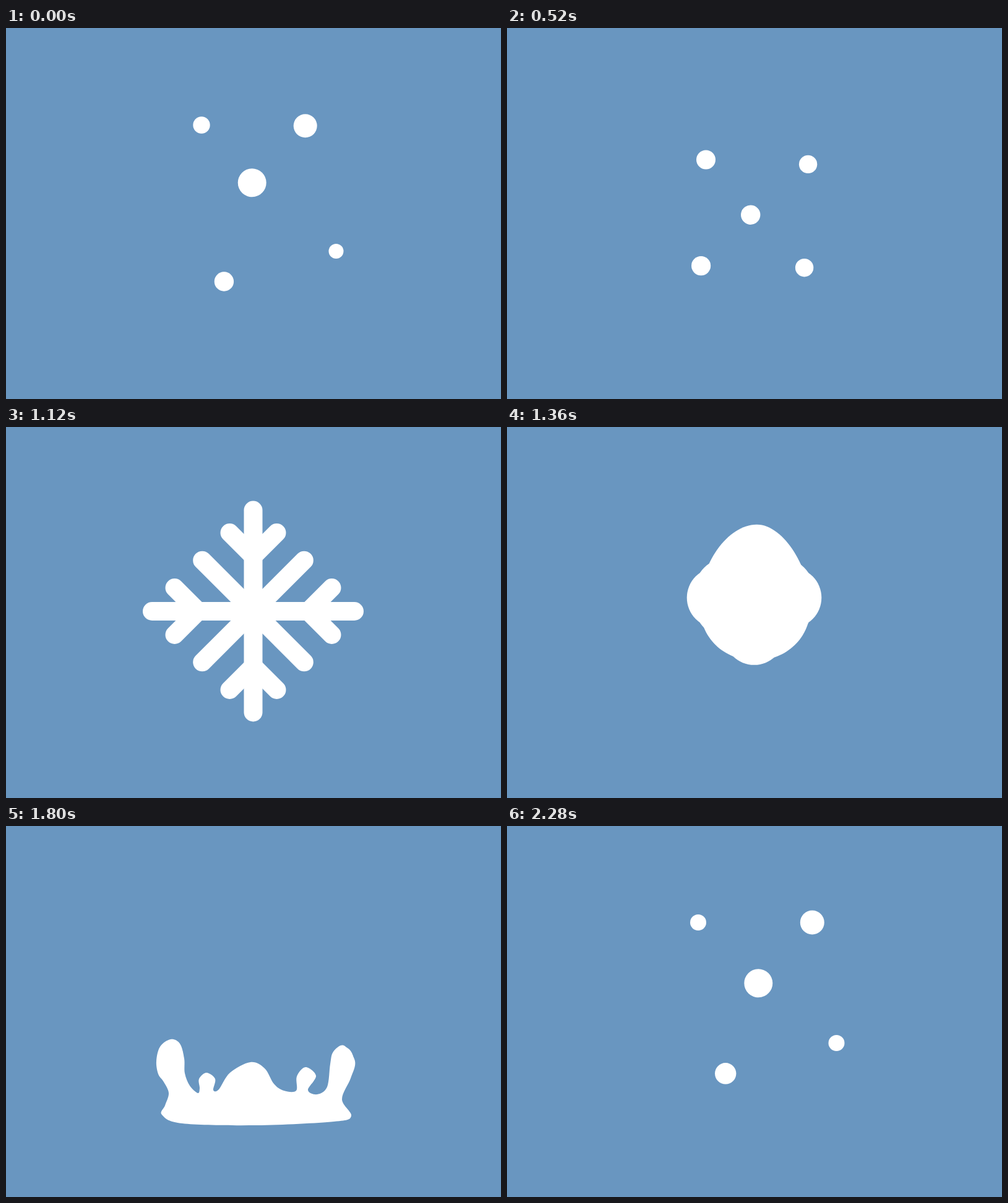
An HTML page with a canvas for the animation above (2320 ms loop, 800x600 px).

```html
<!DOCTYPE html>
<html>
<head>
<meta charset="utf-8">
<title>Snow, water, drops</title>
<style>
html, body { margin: 0; width: 100%; height: 100%; overflow: hidden; background: #6996c0; }
canvas { display: block; }
</style>
</head>
<body>
<canvas id="stage" width="800" height="600"></canvas>
<script>
const ctx = document.getElementById('stage').getContext('2d');
const LOOP = 2320, STEP = 40, FLOOR = 483;

// Drop keys: time, x, y, rx, ry. Negative times lie at the end of the loop.
const drops = [
  { tilt: 0, keys: [[-520, 266, 370, 20, 23], [-360, 261, 234, 25.5, 24], [-240, 270, 175, 19, 19],
    [-120, 286, 157, 14, 14], [-40, 309, 156, 13, 13], [0, 316, 157, 13.7, 13.7],
    [240, 331, 186, 15, 15], [520, 321.5, 213, 15.5, 15.5], [600, 317, 217, 15, 15]] },
  { tilt: 0, keys: [[-520, 545, 380, 17, 23], [-360, 547, 236, 21, 28], [-240, 532, 178, 21, 23],
    [-120, 510, 157, 20, 20], [-40, 493.3, 156, 19.5, 19.5], [0, 483.7, 158.3, 19, 19],
    [240, 468, 188, 16, 16], [520, 486.6, 220.4, 14.7, 14.7], [600, 481.5, 217.5, 15, 15]] },
  { tilt: -0.6, keys: [[-520, 485, 407, 13, 13], [-360, 485, 319, 22.5, 18.5], [-200, 446, 274, 22, 21],
    [-40, 406.3, 254.3, 23, 23], [0, 397.7, 250.3, 23, 23],
    [240, 378, 272, 19, 19], [520, 393.7, 302.2, 15.7, 15.7], [600, 399.5, 298, 15, 15]] },
  { tilt: 0, keys: [[-520, 490, 470, 8, 8], [-360, 500, 470, 8, 8], [-200, 523, 362, 12, 13],
    [-120, 529, 344, 12.5, 12.5], [-40, 532.5, 351, 13, 13], [0, 533.5, 361, 12, 12],
    [240, 516, 402, 13.5, 13.5], [520, 480.6, 387.7, 14.7, 14.7], [600, 482, 380.5, 15, 15]] },
  { tilt: 0, keys: [[-520, 324, 412, 10, 11], [-360, 324.5, 373, 18.5, 19], [-200, 340, 362, 18, 18],
    [-40, 353.2, 400.3, 17.2, 17.2], [0, 352.4, 410, 15.7, 15.7],
    [200, 335, 430, 15.5, 15.5], [360, 312, 411, 15.5, 15.5], [520, 313.6, 384.6, 15.6, 15.6],
    [600, 317, 382, 15, 15]] }
];

const crown = [
  [252, 467], [257, 452], [263, 432], [255, 414], [246, 401], [243, 380], [249, 357], [266, 345],
  [281, 352], [288, 376], [289, 400], [297, 420], [310, 432], [313, 424], [312, 409], [324, 399],
  [338, 409], [335, 427], [344, 426], [362, 399], [395, 382], [418, 392], [433, 417], [449, 428],
  [469, 428], [470, 405], [484, 390], [501, 404], [488, 427], [503, 434], [519, 422], [524, 385],
  [529, 365], [546, 355], [564, 380], [557, 408], [543, 442], [558, 469], [530, 478], [405, 484], [285, 481]
];
const surface = [
  [234, 478], [265, 471], [300, 460], [313, 456], [325, 455], [337, 457], [350, 465], [370, 473],
  [387, 477], [410, 477], [430, 474], [455, 459], [472, 452.5], [510, 451.5], [535, 463], [564, 478]
];
const underside = [[550, 481], [425, 484], [300, 483]];
// Crown arms that stretch out behind the flying drops: drop index, foot x, width
const necks = [[0, 276, 36], [1, 536, 34], [2, 482, 20], [4, 324, 18]];

const lerp = (a, b, p) => a + (b - a) * p;
const part = (t, a, b) => Math.min(1, Math.max(0, (t - a) / (b - a)));
const smooth = p => p * p * (3 - 2 * p);
const easeOut = p => 1 - (1 - p) ** 2;

// Cubic spline through the keys
function pose(keys, t) {
  let i = 0;
  while (i < keys.length - 2 && t >= keys[i + 1][0]) i++;
  const a = keys[i], b = keys[i + 1], span = b[0] - a[0], p = part(t, a[0], b[0]);
  const before = keys[i - 1] || a, after = keys[i + 2] || b;
  return a.slice(1).map((v, k) => {
    const w = b[k + 1];
    const m = (w - before[k + 1]) / (b[0] - before[0]) * span;
    const n = (after[k + 1] - v) / (after[0] - a[0]) * span;
    const q = 1 - p;
    return v * (1 + 2 * p) * q * q + m * p * q * q + w * p * p * (3 - 2 * p) - n * p * p * q;
  });
}

function blob(pts) {
  const n = pts.length, at = i => pts[(i + n) % n];
  ctx.beginPath();
  ctx.moveTo(...pts[0]);
  for (let i = 0; i < n; i++) {
    const [a, b, c, d] = [at(i - 1), at(i), at(i + 1), at(i + 2)];
    ctx.bezierCurveTo(b[0] + (c[0] - a[0]) / 6, b[1] + (c[1] - a[1]) / 6,
      c[0] - (d[0] - b[0]) / 6, c[1] - (d[1] - b[1]) / 6, c[0], c[1]);
  }
  ctx.fill();
}

function line(x1, y1, x2, y2, width) {
  ctx.lineWidth = width;
  ctx.beginPath();
  ctx.moveTo(x1, y1);
  ctx.lineTo(x2, y2);
  ctx.stroke();
}

function drawDrops(t) {
  const u = t >= 1800 ? t - LOOP : t;
  for (const { keys, tilt } of drops) {
    const [x, y, rx, ry] = pose(keys, u);
    ctx.beginPath();
    ctx.ellipse(x, y, rx, ry, tilt, 0, 7);
    ctx.fill();
  }
}

function drawFlake(t) {
  const melt = smooth(part(t, 1120, 1440));
  const size = 1 - 0.75 * melt, width = 30 + 80 * melt;
  const inward = smooth(part(t, 560, 760));
  const axis = 163.5 * easeOut(part(t, 680, 960));
  const twig = 38 * easeOut(part(t, 880, 1080));
  ctx.save();
  ctx.translate(399.5, 298 - 26 * melt);
  for (let i = 0; i < 4; i++) {
    ctx.save();
    ctx.rotate(i * Math.PI / 2);
    ctx.scale(size, size);
    const w = width / size, tip = 82.3, root = tip * (1 - inward);
    line(tip, -tip, root, -root, w);
    line(0, 0, 0, -axis, w);
    if (twig) for (const side of [-1, 1]) line(0, -89, side * twig, -89 - twig, w);
    ctx.restore();
  }
  ctx.beginPath();
  ctx.arc(0, 0, 15, 0, 7);
  ctx.fill();
  ctx.restore();
}

function drawEgg(t) {
  const grow = lerp(0.2, 1, smooth(part(t, 1120, 1440)));
  const fall = 91 * part(t, 1520, 1620) ** 2;
  const squash = part(t, 1620, 1760);
  ctx.save();
  if (t < 1520) {
    ctx.translate(401, 275);
    ctx.scale(grow, grow);
    ctx.translate(-401, -275);
  } else {
    ctx.translate(401, 392 + fall);
    ctx.scale(1 + 0.25 * squash, 1 - 0.85 * squash);
    ctx.translate(-401, -392);
  }
  ctx.beginPath();
  ctx.moveTo(404, 141);
  ctx.bezierCurveTo(350, 141, 298.5, 215, 298.5, 290);
  ctx.bezierCurveTo(298.5, 350, 343, 392, 401, 392);
  ctx.bezierCurveTo(459, 392, 503.5, 350, 503.5, 292);
  ctx.bezierCurveTo(503.5, 225, 455, 141, 404, 141);
  ctx.fill();
  ctx.restore();
}

function surfaceY(x) {
  const i = Math.max(1, surface.findIndex(s => s[0] >= x));
  const [a, b] = [surface[i - 1], surface[i]];
  return lerp(a[1], b[1], part(x, a[0], b[0]));
}

function drawSplash(t) {
  const rise = easeOut(part(t, 1620, 1800));
  const sink = smooth(part(t, 1800, 1960));
  const dry = part(t, 1960, 2160);
  const top = crown.length - underside.length;
  const sx = lerp(0.7, 1, rise) * (1 - 0.7 * dry), sy = rise * (1 - dry);
  blob(crown.map(([x, y], i) => {
    const px = lerp(234, 564, i / (top - 1));
    const flat = i < top ? [px, surfaceY(px)] : underside[i - top];
    return [400 + (lerp(x, flat[0], sink) - 400) * sx, FLOOR + (lerp(y, flat[1], sink) - FLOOR) * sy];
  }));
  const thin = 1 - part(t, 1800, 1920);
  if (t > 1800 && thin) for (const [i, foot, width] of necks) {
    const [x, y] = pose(drops[i].keys, t - LOOP);
    line(foot, 462, x, y, width * thin);
  }
}

function draw(now) {
  const t = Math.floor(now % LOOP / STEP) * STEP;
  ctx.fillStyle = '#6996c0';
  ctx.fillRect(0, 0, 800, 600);
  ctx.fillStyle = ctx.strokeStyle = '#fff';
  ctx.lineCap = 'round';
  if (t < 600 || t >= 1800) drawDrops(t);
  if (t >= 600 && t < 1440) drawFlake(t);
  if (t > 1120 && t < 1760) drawEgg(t);
  if (t > 1620 && t < 2160) drawSplash(t);
  requestAnimationFrame(draw);
}
requestAnimationFrame(draw);
</script>
</body>
</html>
```
